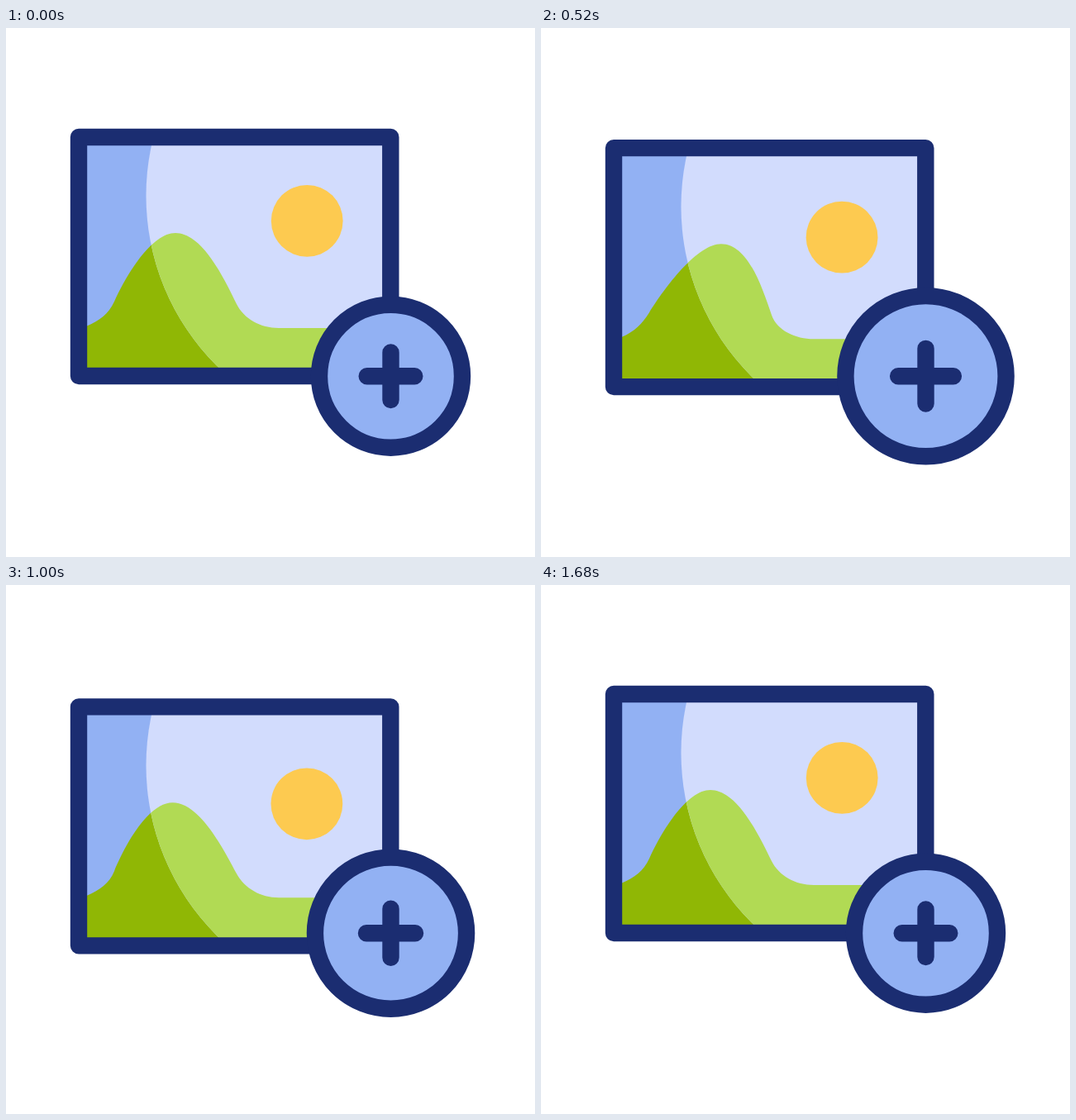
These frames come from a looping animation (640 by 640 pixels, 1880 ms). An HTML page:

```html
<!DOCTYPE html>
<html lang="en">
<head>
<meta charset="utf-8">
<title>Add picture</title>
<style>
  html, body { margin: 0; width: 100%; height: 100%; overflow: hidden; background: #fff; }
  svg { display: block; width: 100vw; height: 100vh; }
  .line { stroke: #1b2d71; stroke-width: 20.4; stroke-linecap: round; stroke-linejoin: round; fill: none; }
  #badge { fill: #92b1f3; }
</style>
</head>
<body>
<svg viewBox="0 0 640 640">
  <defs>
    <path id="pane" d="M88 132H465.3V421H88Z"/>
    <path id="hill"/>
    <clipPath id="inside"><use href="#pane"/></clipPath>
    <clipPath id="lit"><circle cx="459.5" cy="203" r="290"/></clipPath>
  </defs>
  <g id="picture">
    <g clip-path="url(#inside)">
      <use href="#pane" fill="#92b1f3"/>
      <use href="#hill" fill="#90b705"/>
      <g clip-path="url(#lit)">
        <use href="#pane" fill="#d2dcfd"/>
        <use href="#hill" fill="#b1da54"/>
      </g>
      <circle id="sun" cx="364.2" cy="233.3" r="43.4" fill="#fdca50"/>
    </g>
    <use href="#pane" class="line"/>
  </g>
  <g transform="translate(465.5 421.2)">
    <circle id="badge" class="line"/>
    <path id="plus" class="line"/>
  </g>
</svg>
<script>
const LOOP = 1880, STEP = 40, LAST = 1680;
const [picture, sun, hill, badge, plus] =
  ['picture', 'sun', 'hill', 'badge', 'plus'].map(id => document.getElementById(id));

// Smooth 0 to 1 between two times.
function ease(t, from, to) {
  const u = Math.min(1, Math.max(0, (t - from) / (to - from)));
  return u * u * (3 - 2 * u);
}

// Up for 400 ms, a short rest, then down for 480 ms.
const swell = (t, from) => ease(t, from, from + 400) - ease(t, from + 480, from + 960);

// The summit slides sideways while the slopes at its feet turn with it.
function hillPath(lean) {
  const turn = lean * 0.01;
  const handle = (x, y, length, angle) =>
    `${x + length * Math.cos(angle + turn)} ${y + length * Math.sin(angle + turn)}`;
  const left = -1.144, right = -2.034, top = 205 + lean;
  return `M80 424V365L98 360.5
    C113 354 ${handle(131, 331, -16.5, left)} 131 331
    C${handle(131, 331, 36, left)} ${top - 29} 248 ${top} 248
    C${top + 33} 248 ${handle(279, 334, 33.5, right)} 279 334
    C${handle(279, 334, -20, right)} 308 363 330 363H480V424Z`;
}

function draw(ms) {
  const t = Math.min(LAST, Math.floor((ms % LOOP) / STEP) * STEP);

  const drop = 16.5 * (ease(t, 80, 700) - ease(t, 900, 1520));
  picture.setAttribute('transform', `translate(0 ${drop})`);

  const sink = 20.5 * (ease(t, 320, 840) - ease(t, 860, 1330));
  sun.setAttribute('transform', `translate(${-sink * 0.02} ${sink})`);

  const lean = 13.6 * ease(t, 200, 570) - 24.6 * ease(t, 660, 1200) + 11 * ease(t, 1200, 1540);
  hill.setAttribute('d', hillPath(lean));

  badge.setAttribute('r', 86.5 + 13.5 * swell(t, 240));
  const arm = 28.8 + 4.7 * swell(t, 160);
  plus.setAttribute('d', `M${-arm} 0H${arm}M0 ${-arm}V${arm}`);
}

const start = performance.now();
function tick() {
  draw(performance.now() - start);
  requestAnimationFrame(tick);
}
tick();
</script>
</body>
</html>
```
